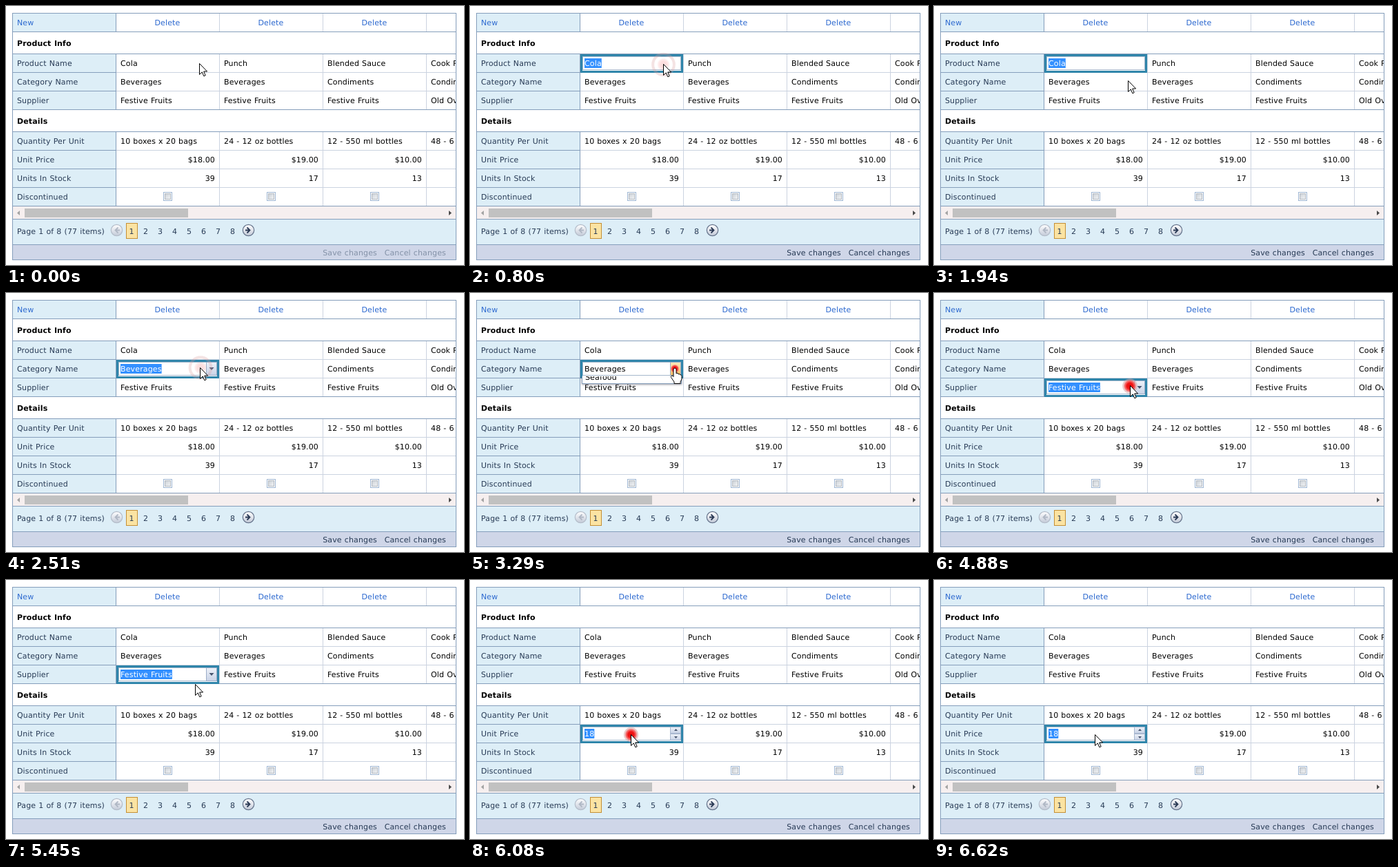
Animation, 664 px wide and 376 px high, one loop 6.75 s. Source, as an HTML page:

```html
<!DOCTYPE html>
<html lang="en">
<head>
<meta charset="utf-8">
<title>Vertical grid cell editing</title>
<style>
  html, body { margin: 0; width: 100%; height: 100%; overflow: hidden; background: #fff; }
  svg { display: block; }
  text {
    font: 11px "DejaVu Sans", Verdana, sans-serif;
    letter-spacing: .14px; word-spacing: .4px;
    text-rendering: geometricPrecision; white-space: pre;
  }
  .bold { font-weight: bold; }
</style>
</head>
<body>
<svg id="stage" width="664" height="376" viewBox="0 0 664 376">
  <defs>
    <clipPath id="gridClip"><rect x="10" y="11" width="642" height="357"/></clipPath>
    <clipPath id="listClip"><rect x="150" y="121" width="180" height="140"/></clipPath>
    <linearGradient id="buttonFill" x2="0" y2="1">
      <stop stop-color="#eef2f9"/><stop offset="1" stop-color="#c8d2e6"/>
    </linearGradient>
    <linearGradient id="hoverFill" x2="0" y2="1">
      <stop stop-color="#fdeabb"/><stop offset="1" stop-color="#f6bd64"/>
    </linearGradient>
    <linearGradient id="pageFill" x2="0" y2="1">
      <stop stop-color="#fff"/><stop offset="1" stop-color="#c3cad8"/>
    </linearGradient>
    <linearGradient id="checkFill" x2="1" y2="1">
      <stop stop-color="#cbd0d6"/><stop offset="1" stop-color="#f4f5f6"/>
    </linearGradient>
    <radialGradient id="dotFill">
      <stop stop-color="#e80808"/><stop offset=".5" stop-color="#f01818"/>
      <stop offset=".8" stop-color="#f65050" stop-opacity=".75"/>
      <stop offset="1" stop-color="#fa9090" stop-opacity=".1"/>
    </radialGradient>
    <filter id="shadow" x="-10%" y="-10%" width="120%" height="120%">
      <feDropShadow dx="0" dy="1" stdDeviation="1.6" flood-color="#334" flood-opacity=".5"/>
    </filter>
  </defs>
</svg>
<script>
const LOOP = 6750, RIPPLE = 720;
const DARK = '#859ebb', LIGHT = '#cbd3e0', PALE = '#ddeef7', INK = '#283b56',
      LINK = '#2f6bd0', TEAL = '#2f85aa';
const stage = document.getElementById('stage');

function add(parent, tag, attrs, content) {
  const el = document.createElementNS('http://www.w3.org/2000/svg', tag);
  for (const key in attrs) el.setAttribute(key, attrs[key]);
  if (content !== undefined) el.textContent = content;
  parent.append(el);
  return el;
}
const set = (el, attrs) => { for (const key in attrs) el.setAttribute(key, attrs[key]); };
const show = (el, on) => set(el, { visibility: on ? 'visible' : 'hidden' });
const box = (p, x, y, width, height, fill, more) =>
  add(p, 'rect', { x, y, width, height, fill, ...more });
const frame = (p, x, y, w, h, stroke, fill = 'none', more) =>
  box(p, x + .5, y + .5, w - 1, h - 1, fill, { stroke, ...more });
const label = (p, x, y, content, fill = '#000', more) =>
  add(p, 'text', { x, y, fill, ...more }, content);
const path = (p, d, fill, more) => add(p, 'path', { d, fill, ...more });
const group = (p, more) => add(p, 'g', more);
const END = { 'text-anchor': 'end' }, MID = { 'text-anchor': 'middle' };

const SUPPLIER = 'Festive Fruits';
const rows = [
  [69, 'Product Name', ['Cola', 'Punch', 'Blended Sauce', 'Cook Rye Mix']],
  [96, 'Category Name', ['Beverages', 'Beverages', 'Condiments', 'Condiments']],
  [123, 'Supplier', [SUPPLIER, SUPPLIER, SUPPLIER, 'Old Oven Pantry']],
  [182, 'Quantity Per Unit', ['10 boxes x 20 bags', '24 - 12 oz bottles', '12 - 550 ml bottles', '48 - 6 oz jars']],
  [209, 'Unit Price', ['$18.00', '$19.00', '$10.00']],
  [236, 'Units In Stock', ['39', '17', '13']],
  [263, 'Discontinued', []]
];

function drawGrid() {
  const g = group(stage, { 'clip-path': 'url(#gridClip)' });
  box(g, 10, 11, 149, 26, PALE);
  label(g, 16, 28, 'New', LINK);
  [234, 384, 534].forEach(x => label(g, x, 28, 'Delete', LINK, MID));
  [309, 459, 609].forEach(x => box(g, x, 11, 1, 26, LIGHT));
  box(g, 159, 11, 1, 26, DARK);
  label(g, 16, 58, 'Product Info', '#000', { class: 'bold' });
  label(g, 16, 171, 'Details', '#000', { class: 'bold' });

  rows.forEach(([top, name, values], i) => {
    box(g, 10, top + 1, 149, 26, PALE);
    box(g, 160, top + 27, 492, 1, LIGHT);
    box(g, 10, top + 27, 150, 1, DARK);
    box(g, 159, top, 1, 28, DARK);
    label(g, 16, top + 18, name, INK);
    [309, 459, 609].forEach(x => box(g, x, top + 1, 1, 26, LIGHT));
    values.forEach((value, c) => {
      const right = i === 4 || i === 5;
      label(g, (right ? 303 : 166) + c * 150, top + 18, value, '#000', right ? END : {});
    });
  });
  [228, 378, 528].forEach(x => {
    frame(g, x, 270, 13, 13, '#9fb6d2', '#fff');
    frame(g, x + 2, 272, 9, 9, '#b3bac2', 'url(#checkFill)');
  });
  [37, 69, 150, 182, 290].forEach(y => box(g, 10, y, 642, 1, DARK));

  box(g, 10, 291, 642, 18, '#f6efef');
  box(g, 27, 294, 237, 13, '#c1c1c1');
  path(g, 'M20 297v7l-4-3.5z', '#a3a3a3');
  path(g, 'M642 297v7l4-3.5z', '#484848');

  box(g, 10, 309, 642, 37, PALE);
  box(g, 10, 309, 642, 1, DARK);
  label(g, 16, 331, 'Page 1 of 8 (77 items)', INK);
  frame(g, 174, 315, 17, 23, '#c48f35', '#fbe3a2');
  for (let n = 1; n <= 8; n++) label(g, 161 + n * 21 - (n === 1 ? 0 : .5), 331, n, INK, MID);
  pageButton(g, 160.5, 325.5, 'M162.5 321.5l-4 4 4 4M159 325.5h6', '#b4bdca', '#b0b8c5');
  pageButton(g, 351.5, 325.5, 'M349.5 321.5l4 4-4 4M353 325.5h-6', '#66748c', '#2b3a55');

  box(g, 10, 346, 642, 22, '#cfd6e8');
  box(g, 10, 346, 642, 1, DARK);
  frame(stage, 9, 10, 644, 359, DARK);
}

function pageButton(p, cx, cy, d, edge, ink) {
  add(p, 'circle', { cx, cy, r: 8.2, fill: 'url(#pageFill)', stroke: edge, 'stroke-width': 1.2 });
  path(p, d, 'none', { stroke: ink, 'stroke-width': 1.8 });
}

// An open cell editor; kind is 'text', 'combo' or 'spin'.
function makeEditor(top, value, kind) {
  const g = group(stage);
  box(g, 161.5, top + 2.5, 146, 24, '#fff', { stroke: TEAL, 'stroke-width': 3 });
  frame(g, 163, top + 4, 143, 20, '#a5b8cc');
  const mark = box(g, 166, top + 7, 10, 14, '#3390ff');
  const text = label(g, 166, top + 18, value, '#fff');
  mark.setAttribute('width', text.getComputedTextLength());
  let button;
  if (kind === 'combo') {
    button = frame(g, 290, top + 4, 16, 20, '#9cadc8', 'url(#buttonFill)');
    path(g, `M294.5 ${top + 12}h7l-3.5 4z`, '#46546e');
  } else if (kind === 'spin') {
    [4, 14].forEach(dy => frame(g, 290, top + dy, 16, 10, '#a9b8d0', 'url(#buttonFill)'));
    path(g, `M296 ${top + 10}h5l-2.5 -3zM296 ${top + 18}h5l-2.5 3z`, '#46546e');
  }
  return { g, mark, text, button };
}

function makeList() {
  const clip = group(stage, { 'clip-path': 'url(#listClip)' });
  const g = group(clip);
  frame(g, 162, 121, 145, 131, DARK, '#fff', { filter: 'url(#shadow)' });
  box(g, 163, 122, 143, 17, '#fbe3a2');
  ['Beverages', 'Condiments', 'Confections', 'Dairy Products', 'Grains/Cereals',
   'Meat/Poultry', 'Produce', 'Seafood']
    .forEach((name, i) => label(g, 167, 134 + i * 16, name));
  return { clip, g };
}

drawGrid();
const footer = [
  label(stage, 538, 362, 'Save changes', INK, END),
  label(stage, 638, 362, 'Cancel changes', INK, END)
];
const editors = [
  { from: 410, to: 2120, ...makeEditor(69, 'Cola', 'text') },
  { from: 2150, to: 4810, ...makeEditor(96, 'Beverages', 'combo') },
  { from: 4840, to: 6020, ...makeEditor(123, SUPPLIER, 'combo') },
  { from: 6050, to: LOOP, ...makeEditor(209, '18', 'spin') }
];
const list = makeList();

const clicks = [
  [260, 280.5, 85], [1970, 282, 108.5], [3200, 297, 110],
  [3700, 297, 110], [4690, 284, 135], [5900, 233.5, 224.5]
].map(([at, cx, cy]) => ({
  at,
  ring: add(stage, 'circle', { cx, cy, fill: 'none', stroke: '#d8a0a0', 'stroke-width': 4 }),
  dot: add(stage, 'circle', { cx, cy, fill: 'url(#dotFill)' })
}));

const outline = { stroke: '#000', 'stroke-width': 1, 'stroke-linejoin': 'round' };
const arrow = path(stage, 'M.5 .5V16.5L4.3 12.9 6.8 18.8 9.2 17.8 6.7 12H11.6Z', '#fff', outline);
const hand = path(stage, 'M-2 2a2 2 0 0 1 4 0V8a1.8 1.8 0 0 1 3.2 1a1.7 1.7 0 0 1 2.8 1' +
  'a1.5 1.5 0 0 1 2 1.5V16l-2 4v2.5H-1V20L-5.5 13.5a1.7 1.7 0 0 1 2.5-2.2l1 1.2z', '#fff', outline);

// start, end, destination
const moves = [
  [0, 30, 280, 84], [1480, 1760, 281, 108], [2890, 3120, 297, 109],
  [4420, 4620, 284, 134], [5412, 5830, 233, 224]
];

const clamp = v => Math.max(0, Math.min(1, v));
const easeOut = v => 1 - (1 - clamp(v)) ** 2.2;

function pointerAt(t) {
  let x = 280, y = 83;
  for (const [start, end, toX, toY] of moves) {
    const k = easeOut((t - start) / (end - start));
    x += (toX - x) * k;
    y += (toY - y) * k;
  }
  return [x, y];
}

function drawClick({ at, ring, dot }, t) {
  const p = (t - at) / RIPPLE, on = p >= 0 && p < 1;
  show(ring, on && p > .2);
  show(dot, on && p < .8);
  if (!on) return;
  set(dot, { r: 9.5 * (1 - (1 - clamp(p / .3)) ** 2), opacity: 1 - clamp((p - .45) / .35) });
  const grow = clamp((p - .2) / .75);
  set(ring, { r: 8 + 10 * grow, opacity: .55 - .35 * grow });
}

function render(t) {
  let editing = false;
  for (const e of editors) {
    const on = t >= e.from && t < e.to;
    e.g.style.display = on ? '' : 'none';
    editing = editing || on;
  }
  footer.forEach(el => set(el, { fill: editing ? INK : '#8492a8' }));

  const [x, y] = pointerAt(t);
  const overButton = t >= 3000 && t < 4480;
  const category = editors[1];
  show(category.mark, t < 3200);
  set(category.text, { fill: t < 3200 ? '#fff' : '#000' });
  set(category.button, { fill: overButton ? 'url(#hoverFill)' : 'url(#buttonFill)' });

  const open = easeOut((t - 3282) / 240) * (1 - clamp((t - 3720) / 110));
  list.clip.style.display = open > 0 ? '' : 'none';
  set(list.g, { transform: `translate(0 ${Math.round(-131 * (1 - open))})` });

  clicks.forEach(c => drawClick(c, t));
  const pointer = `translate(${Math.round(x)} ${Math.round(y)})`;
  set(arrow, { transform: pointer });
  set(hand, { transform: pointer });
  show(arrow, !overButton);
  show(hand, overButton);
}

const started = performance.now();
function tick() {
  render((performance.now() - started) % LOOP);
  requestAnimationFrame(tick);
}
tick();
</script>
</body>
</html>
```
